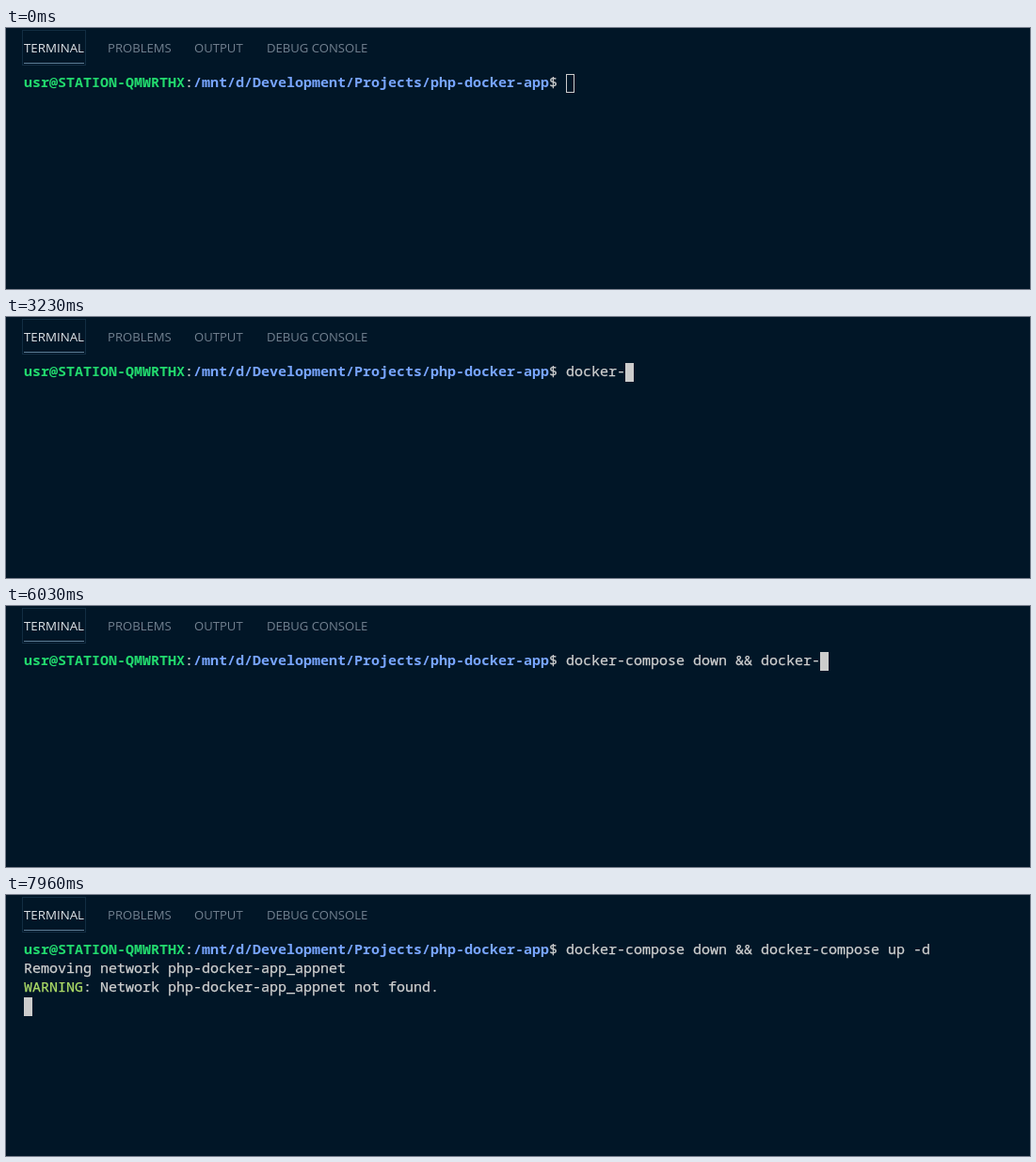
Recreate the animation shown at these times as an HTML page. Size 1088x278 px, loop 8 s.

```html
<!DOCTYPE html>
<html lang="en">
<head>
<meta charset="utf-8">
<title>Terminal</title>
<style>
  html, body { margin: 0; width: 100%; height: 100%; overflow: hidden; background: #011627; }
  svg { display: block; }
  text { white-space: pre; }
  .tab { font: 13.1px "Open Sans", sans-serif; fill: #728190; }
  .active { font-size: 13.3px; fill: #e0e4e8; }
  .mono { font: 15px "Noto Sans Mono", monospace; fill: #d0d0d0; stroke: #d0d0d0; stroke-width: 0.25px; }
  .bold { font-weight: 700; stroke: none; }
  .user { fill: #22da6e; }
  .path { fill: #78a5ff; }
  .warn { fill: #addb67; stroke: #addb67; }
</style>
</head>
<body>
<svg id="stage" width="1088" height="278" viewBox="0 0 1088 278">
  <rect width="1088" height="278" fill="#011627"/>
  <rect x="17.5" y="2.5" width="67" height="37" fill="none" stroke="#122d42"/>
  <rect x="19" y="37" width="64" height="1" fill="#5f7e97"/>
  <text class="tab active" x="19" y="26">TERMINAL</text>
  <text class="tab" x="108" y="26">PROBLEMS</text>
  <text class="tab" x="200" y="26">OUTPUT</text>
  <text class="tab" x="277" y="26">DEBUG CONSOLE</text>
</svg>
<script>
const LOOP = 8000, FOCUS = 2160, TYPE = 2470, ENTER = 7500, OUTPUT = 7960;
const LEFT = 19, TOP = 49, CELL = 9, LINE = 20, PROMPT = 64;

// Keys pressed on each beat; an empty beat is a pause, "<" deletes.
const BEAT = 76.8;
const beats = ("d,,,o,,c,k,er,,-,c,,o,,m,p,o,se,, ,d,o,w,,n, ,,,&,&,, ,,,,,<,, ,," +
  "d,o,c,k,,e,r-,,c,o,,m,p,o,se,, ,u,p, ,-,,d").split(",");

const stage = document.getElementById("stage");

function add(tag, attrs, content = "") {
  const el = document.createElementNS(stage.namespaceURI, tag);
  for (const name in attrs) el.setAttribute(name, attrs[name]);
  el.textContent = content;
  return stage.appendChild(el);
}

function write(content, col, row, style = "") {
  return add("text", {
    class: "mono " + style, x: LEFT + col * CELL, y: TOP + row * LINE + 14
  }, content);
}

function commandAt(t) {
  const count = Math.max(0, Math.floor((t - TYPE) / BEAT) + 1);
  return beats.slice(0, count).reduce(
    (line, keys) => keys === "<" ? line.slice(0, -1) : line + keys, "");
}

write("usr@STATION-QMWRTHX", 0, 0, "bold user");
write(":", 19, 0);
write("/mnt/d/Development/Projects/php-docker-app", 20, 0, "bold path");
write("$", 62, 0);
const typed = write("", PROMPT, 0);
const output = [
  write("Removing network php-docker-app_appnet", 0, 1),
  write("WARNING", 0, 2, "warn"),
  write(": Network php-docker-app_appnet not found.", 7, 2)
];
const cursor = add("rect", { width: CELL - 1, height: LINE - 1, stroke: "#ccc" });

function render(t) {
  const command = commandAt(t);
  typed.textContent = command;

  const done = t >= OUTPUT;
  for (const el of output) el.setAttribute("visibility", done ? "visible" : "hidden");

  const row = done ? 3 : t >= ENTER ? 1 : 0;
  const col = row ? 0 : PROMPT + command.length;
  cursor.setAttribute("x", LEFT + col * CELL + 0.5);
  cursor.setAttribute("y", TOP + row * LINE + 0.5);
  cursor.setAttribute("fill", t >= FOCUS ? "#ccc" : "none");
}

const start = performance.now();
function tick() {
  render((performance.now() - start) % LOOP);
  requestAnimationFrame(tick);
}
tick();
</script>
</body>
</html>
```
